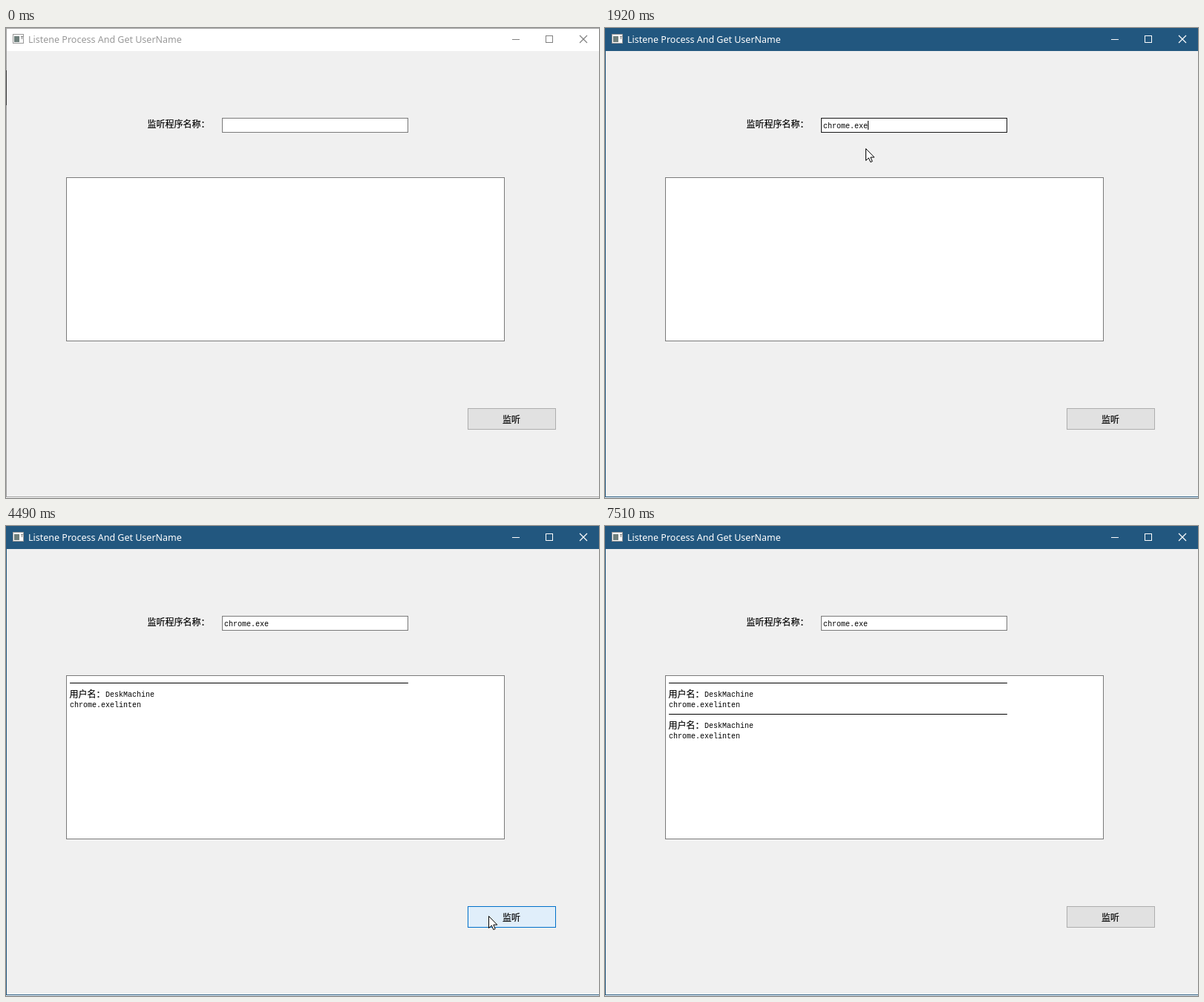
These frames come from a looping animation (799x633 px, 8000 ms). An HTML page:

```html
<!DOCTYPE html>
<html lang="zh">
<head>
<meta charset="utf-8">
<title>Listene Process And Get UserName</title>
<style>
html, body { margin: 0; width: 100%; height: 100%; overflow: hidden; background: #f0f0f0; }
svg { display: block; width: 100%; height: 100%; }
.crisp { shape-rendering: crispEdges; }
.title { font: 12.5px "Noto Sans", "Open Sans", sans-serif; }
.cjk { font: 12px "Noto Sans CJK SC", "Noto Sans CJK", sans-serif; stroke: #000; stroke-width: .2; }
.mono { font: 10px "Liberation Mono", monospace; }
</style>
</head>
<body>
<svg viewBox="0 0 799 633" preserveAspectRatio="none">
  <rect width="799" height="633" fill="#f0f0f0"/>
  <g class="crisp">
    <rect id="bar" width="799" height="31"/>
    <rect y="632" width="799" height="1" fill="#fafafa"/>
    <path id="frame" d="M0 .5H799M.5 0V632M0 631.5H799" fill="none"/>
    <path id="behind" d="M.5 57V104" stroke="#3c3c3c"/>
    <rect x="9.5" y="8.5" width="14" height="12" fill="#fafafa" stroke="#9a9a9a"/>
    <rect x="11" y="11" width="7" height="8" fill="#6f7f7c"/>
    <path d="M20 11.5H23M21.5 11V15" stroke="#888"/>
  </g>
  <text id="title" class="title" x="30" y="20">Listene Process And Get UserName</text>
  <g id="ctrl" fill="none">
    <path class="crisp" d="M682 15.5H692M727.5 10.5H736.5V19.5H727.5Z"/>
    <path d="M773 10L783 20M783 10L773 20" stroke-width="1.2"/>
  </g>

  <text class="cjk" x="190.5" y="133.5">监听程序名称：</text>
  <rect id="field" class="crisp" x="291.5" y="121.5" width="250" height="19" fill="#fff"/>
  <text id="entry" class="mono" x="294" y="135">chrome.exe</text>
  <path id="caret" class="crisp" d="M.5 125V137" stroke="#000"/>

  <rect class="crisp" x="81.5" y="201.5" width="590" height="220" fill="#fff" stroke="#7a7a7a"/>
  <g id="log"></g>

  <rect id="btn" class="crisp" x="622.5" y="512.5" width="118" height="28"/>
  <text class="cjk" x="681" y="531.5" text-anchor="middle">监听</text>

  <path id="arrow" d="M.5 .5V16.5L4.3 13L6.8 18.6L9.2 17.6L6.8 12.1H11.8Z" fill="#fff" stroke="#000"/>
  <path id="beam" class="crisp" d="M-3 -7.5H0M1 -7.5H4M.5 -7V8M-3 8.5H0M1 8.5H4M-1 4.5H2" fill="none" stroke="#000"/>
</svg>
<script>
const LOOP = 8000, STEP = 70;
const ENTER = 70, ACTIVE = 920, PASTE = 1520, PRESS = 2750, PRESS_AGAIN = 4470, LEAVE = 7510;
const CLICK = 140;
const $ = id => document.getElementById(id);
const show = (el, on) => { el.style.display = on ? "" : "none"; };
const attr = (el, o) => { for (const k in o) el.setAttribute(k, o[k]); };

const linear = u => u;
const easeIn = u => u ** 1.4;
const easeOut = u => 1 - (1 - u) ** 1.5;

// Each stroke carries the pointer on from where the last one ended.
const strokes = [
  { at: ENTER, steps: 12, x: 346, y: 135, ease: easeOut },
  { at: 1920, steps: 1, x: 351, y: 162, ease: linear },
  { at: 1990, steps: 6, x: 600, y: 488, ease: linear },
  { at: 2410, steps: 5, x: 650, y: 525, ease: easeOut },
  { at: 5430, steps: 1, x: 651, y: 525, ease: linear },
  { at: 6030, steps: 2, x: 660, y: 528, ease: linear },
  { at: 6760, steps: 3, x: 681, y: 522, ease: linear },
  { at: 7160, steps: 6, x: 815, y: 430, ease: easeIn }
];

function pointer(t) {
  if (t < ENTER || t >= LEAVE) return null;
  let x = 765, y = 663;
  for (const s of strokes) {
    if (t < s.at) break;
    const done = Math.floor((t - s.at) / STEP) + 1;
    const f = s.ease(Math.min(1, done / s.steps));
    x += (s.x - x) * f;
    y += (s.y - y) * f;
  }
  return [Math.round(x), Math.round(y)];
}

const ramp = (t, from, time = 200) => Math.max(0, Math.min(1, (t - from) / time));
const pulse = (t, from, to, time) => ramp(t, from, time) - ramp(t, to, time);
const rgb = c => `rgb(${c.map(Math.round)})`;
const mix = (a, b, f) => a.map((v, i) => v + (b[i] - v) * f);

const GREY = [122, 122, 122], DARK = [23, 23, 23], BLUE = [0, 120, 215];
const FACE = [225, 225, 225], FACE_HOT = [229, 241, 251], FACE_DOWN = [204, 228, 247];
const RIM = [173, 173, 173], RIM_DOWN = [0, 84, 153];

const inside = ([x, y], l, t, r, b) => x >= l && x <= r && y >= t && y <= b;

const blocks = [PRESS, PRESS_AGAIN].map((press, i) => {
  const y = 211 + 42 * i;
  const g = document.createElementNS("http://www.w3.org/2000/svg", "g");
  g.innerHTML = `<path class="crisp" d="M86 ${y + .5}H542" stroke="#000"/>
    <text class="cjk" x="85.5" y="${y + 19.5}">用户名：</text>
    <text class="mono" x="134" y="${y + 19}">DeskMachine</text>
    <text class="mono" x="86" y="${y + 33}">chrome.exelinten</text>`;
  $("log").append(g);
  return { g, at: press + CLICK };
});

function drawWindow(on) {
  attr($("bar"), { fill: on ? "#22577f" : "#fff" });
  attr($("frame"), { stroke: on ? "#22577f" : "#a0a0a0" });
  attr($("title"), { fill: on ? "#fff" : "#999" });
  attr($("ctrl"), { stroke: on ? "#fff" : "#808080" });
  show($("behind"), !on);
}

function drawField(t) {
  const hot = mix(GREY, DARK, ramp(t, 710));
  const focused = mix(hot, BLUE, ramp(t, 1920));
  attr($("field"), { stroke: rgb(mix(focused, GREY, ramp(t, PRESS))) });
  show($("entry"), t >= PASTE);
  show($("caret"), t >= ACTIVE && t < PRESS && (t < 1450 || t >= PASTE));
  attr($("caret"), { transform: `translate(${t < PASTE ? 294 : 354})` });
}

function drawButton(t) {
  const hover = pulse(t, 140, 280) + pulse(t, 2450, 7200);
  const down = pulse(t, PRESS, PRESS + CLICK, 100) + pulse(t, PRESS_AGAIN, PRESS_AGAIN + CLICK, 100);
  attr($("btn"), {
    fill: rgb(mix(mix(FACE, FACE_HOT, hover), FACE_DOWN, down)),
    stroke: rgb(mix(mix(RIM, BLUE, hover), RIM_DOWN, down))
  });
}

function drawPointer(pos) {
  const text = pos && (inside(pos, 291, 121, 541, 140) || inside(pos, 82, 202, 671, 421));
  show($("arrow"), pos && !text);
  show($("beam"), text);
  if (pos) attr($(text ? "beam" : "arrow"), { transform: `translate(${pos})` });
}

function draw(t) {
  drawWindow(t >= ACTIVE);
  drawField(t);
  blocks.forEach(b => show(b.g, t >= b.at));
  drawButton(t);
  drawPointer(pointer(t));
}

const start = performance.now();
function tick() {
  draw((performance.now() - start) % LOOP);
  requestAnimationFrame(tick);
}
tick();
</script>
</body>
</html>
```
